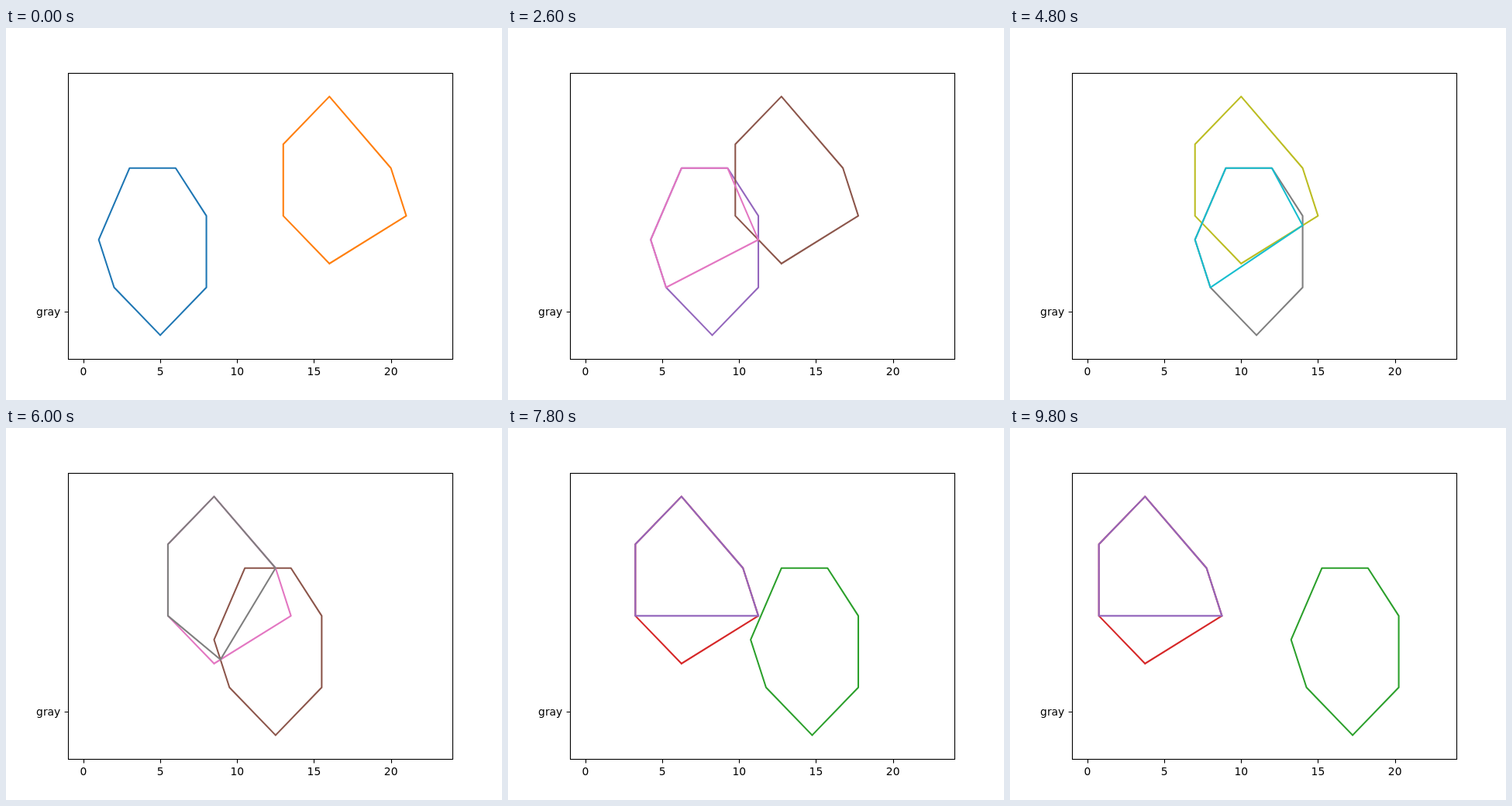
Recreate the animation shown at these times as an HTML page with a canvas. Size 640 px wide and 480 px high, loop 10000 ms.

```html
<!DOCTYPE html>
<html lang="en">
<head>
<meta charset="utf-8">
<title>Moving polygons</title>
<style>
  html, body { margin: 0; width: 100%; height: 100%; overflow: hidden; background: #fff; }
  canvas { display: block; }
</style>
</head>
<body>
<canvas id="stage" width="640" height="480"></canvas>
<script>
const ctx = document.getElementById('stage').getContext('2d');

const STEP_MS = 200, STEPS = 50, SHIFT = 0.25;
const PT = 100 / 72;
const COLORS = ['#1f77b4', '#ff7f0e', '#2ca02c', '#d62728', '#9467bd',
                '#8c564b', '#e377c2', '#7f7f7f', '#bcbd22', '#17becf'];

const LEFT = [[5, 0], [8, 2], [8, 5], [6, 7], [3, 7], [1, 4], [2, 2]];
const RIGHT = [[16, 3], [21, 5], [20, 7], [16, 10], [13, 8], [13, 5]];

const px = x => 99.84 + 19.84 * x;
const py = y => 396.4 - 30.8 * y;
const moved = (poly, dx) => poly.map(([x, y]) => [x + dx, y]);
const edges = poly => poly.map((p, i) => [p, poly[(i + 1) % poly.length]]);

// Position along edge p-q where it meets edge r-s, or Infinity.
function meet([p, q], [r, s]) {
  const ux = q[0] - p[0], uy = q[1] - p[1];
  const vx = s[0] - r[0], vy = s[1] - r[1];
  const wx = r[0] - p[0], wy = r[1] - p[1];
  const cross = ux * vy - uy * vx;
  if (Math.abs(cross) < 1e-9) return Infinity;
  const t = (wx * vy - wy * vx) / cross;
  const k = (wx * uy - wy * ux) / cross;
  const inside = v => v > -1e-9 && v < 1 + 1e-9;
  return inside(t) && inside(k) ? t : Infinity;
}

// First boundary crossing, walking around poly.
function firstHit(poly, other) {
  for (const edge of edges(poly)) {
    const t = Math.min(...edges(other).map(e => meet(edge, e)));
    if (t < Infinity) {
      const [p, q] = edge;
      return [p[0] + t * (q[0] - p[0]), p[1] + t * (q[1] - p[1])];
    }
  }
  return null;
}

// The cut-off part of whichever polygon lies to the left.
function cutPolygon(a, b, n) {
  if (n < 5) return null;
  if (n < 29) {
    const hit = n > 10 && firstHit(a, b);
    return hit ? [hit, ...a.slice(3)] : a.slice(2);
  }
  const hit = firstHit(b, a);
  return hit ? [hit, ...b.slice(n < 35 ? 2 : 1)] : b.slice(1);
}

function drawPolygon(poly, color) {
  ctx.strokeStyle = color;
  ctx.lineWidth = 1.5 * PT;
  ctx.lineJoin = 'round';
  ctx.lineCap = 'square';
  ctx.beginPath();
  for (const [x, y] of [...poly, poly[0]]) ctx.lineTo(px(x), py(y));
  ctx.stroke();
}

function drawAxes() {
  ctx.strokeStyle = ctx.fillStyle = '#000';
  ctx.lineWidth = 0.8 * PT;
  ctx.lineJoin = 'miter';
  ctx.lineCap = 'butt';
  ctx.strokeRect(80.5, 58.5, 496, 369);
  ctx.font = `${10 * PT}px "DejaVu Sans", sans-serif`;
  ctx.beginPath();
  ctx.textAlign = 'center';
  for (let v = 0; v <= 20; v += 5) {
    const x = Math.round(px(v)) + 0.5;
    ctx.moveTo(x, 427.5);
    ctx.lineTo(x, 432.4);
    ctx.fillText(v, px(v), 448);
  }
  ctx.moveTo(80.5, 366.5);
  ctx.lineTo(75.6, 366.5);
  ctx.stroke();
  ctx.textAlign = 'right';
  ctx.fillText('gray', 70.3, 371);
}

function draw(n) {
  ctx.fillStyle = '#fff';
  ctx.fillRect(0, 0, 640, 480);
  const a = moved(LEFT, n * SHIFT), b = moved(RIGHT, -n * SHIFT);
  const cut = cutPolygon(a, b, n);
  // The colour cycle runs on, one colour per drawn polygon.
  const first = n < 5 ? 2 * n : 3 * n + 5;
  [a, b, cut].forEach((poly, i) => {
    if (poly) drawPolygon(poly, COLORS[(first + i) % 10]);
  });
  drawAxes();
}

const start = performance.now();
function tick() {
  const t = performance.now() - start;
  draw(Math.floor(t / STEP_MS) % STEPS);
  requestAnimationFrame(tick);
}
tick();
</script>
</body>
</html>
```
